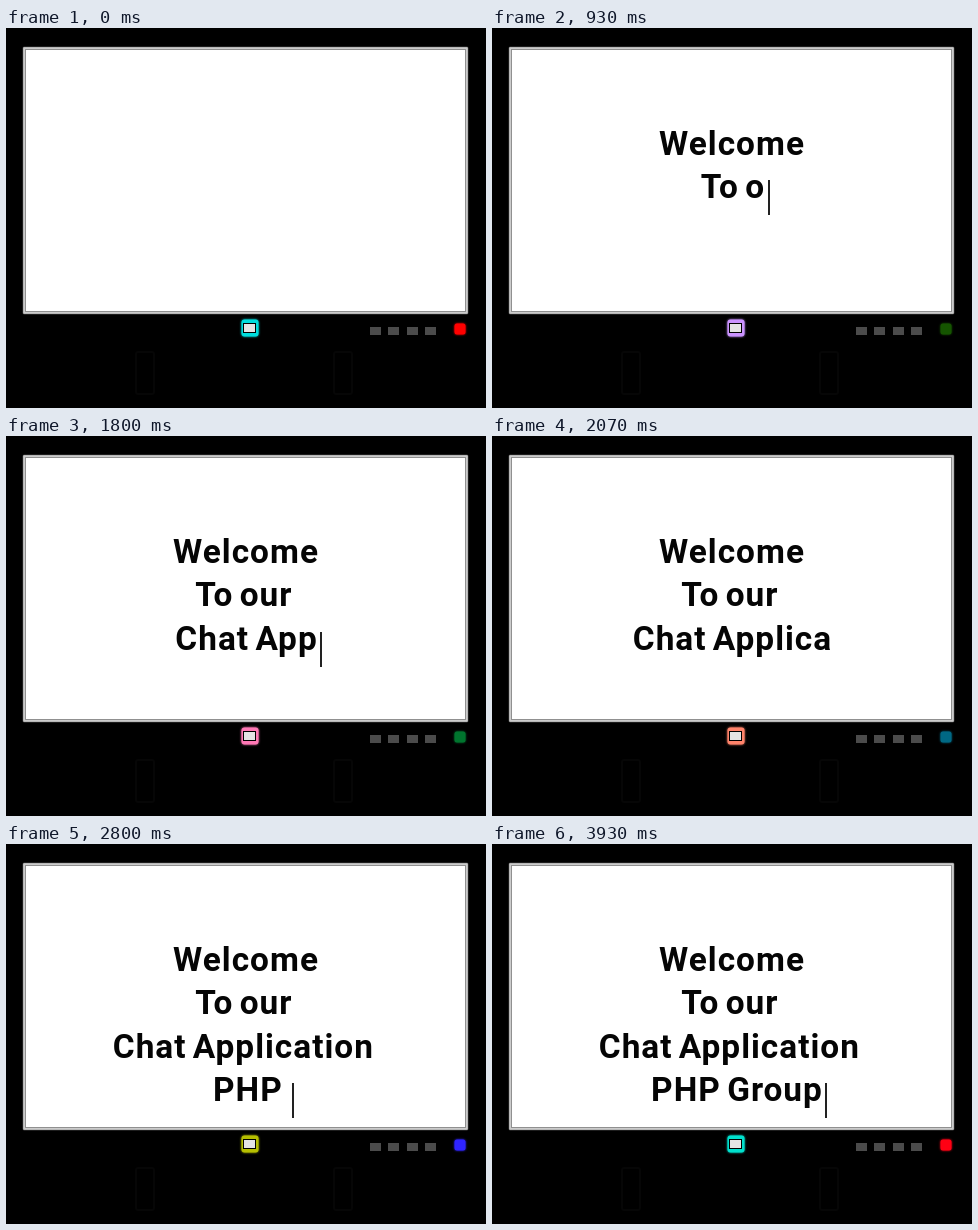
Write an HTML page that moves like this. It is 480 px wide and 380 px high and loops after 3.99 s.

```html
<!DOCTYPE html>
<html lang="en">
<head>
<meta charset="utf-8">
<title>Welcome screen</title>
<style>
  html, body { margin: 0; width: 100%; height: 100%; overflow: hidden; background: #000; }
  svg { display: block; }
  text {
    font: 700 33.4px Roboto, sans-serif;
    letter-spacing: 1px;
    word-spacing: -3px;
    text-anchor: middle;
    white-space: pre;
    fill: #050505;
  }
</style>
</head>
<body>
<svg id="stage" width="480" height="380" viewBox="0 0 480 380">
  <rect width="480" height="380"/>
  <g fill="none" stroke="#060606" stroke-width="2">
    <rect x="130" y="324" width="18" height="42" rx="2"/>
    <rect x="328" y="324" width="18" height="42" rx="2"/>
  </g>
  <rect x="17" y="19" width="445" height="267" rx="1" fill="#ccc" stroke="#777" stroke-width=".5"/>
  <rect x="19.5" y="21.5" width="440" height="262" fill="#fff" stroke="#909090"/>
  <g fill="#4b4b4b">
    <rect x="364" y="299" width="11" height="8"/>
    <rect x="382" y="299" width="11" height="8"/>
    <rect x="401" y="299" width="11" height="8"/>
    <rect x="419" y="299" width="11" height="8"/>
  </g>
  <g class="hue" color="#0dd">
    <rect x="235.5" y="291.5" width="17" height="17" rx="3" fill="currentColor"/>
    <rect x="237.5" y="295.5" width="12" height="9" fill="#e4e4e4" stroke="#000"/>
  </g>
  <rect class="hue" color="#f00" x="448.5" y="295.5" width="11" height="11" rx="2.5" fill="currentColor"/>
  <rect id="cursor" width="2" height="35" fill="#222"/>
</svg>
<script>
const LOOP = 3990, CHAR_MS = 73, BLINK_MS = 1000;
const message = "Welcome\nTo our \nChat Application \nPHP Group";
const centers = [240, 241, 240.5, 245];
const baselines = [127, 170, 214, 257];

const stage = document.getElementById("stage");
const cursor = document.getElementById("cursor");
const hued = document.querySelectorAll(".hue");
const rows = centers.map((x, i) => {
  const row = document.createElementNS(stage.namespaceURI, "text");
  row.setAttribute("x", x);
  row.setAttribute("y", baselines[i]);
  return stage.appendChild(row);
});

function draw(t) {
  const lines = message.slice(0, Math.floor(t / CHAR_MS)).split("\n");
  rows.forEach((row, i) => row.textContent = lines[i] || "");

  // The cursor follows the line being typed.
  const last = lines.length - 1;
  const width = lines[last] ? rows[last].getComputedTextLength() : 0;
  cursor.setAttribute("x", Math.round(centers[last] + width / 2 + 2.5));
  cursor.setAttribute("y", baselines[last] - 18);
  cursor.style.opacity = t % BLINK_MS < BLINK_MS / 2 ? 0 : 1;

  const glow = "drop-shadow(0 0 1px currentColor)";
  hued.forEach(el => el.style.filter = `${glow} hue-rotate(${t / LOOP * 360}deg)`);
}

const start = performance.now();
function tick() {
  draw((performance.now() - start) % LOOP);
  requestAnimationFrame(tick);
}
tick();
</script>
</body>
</html>
```
